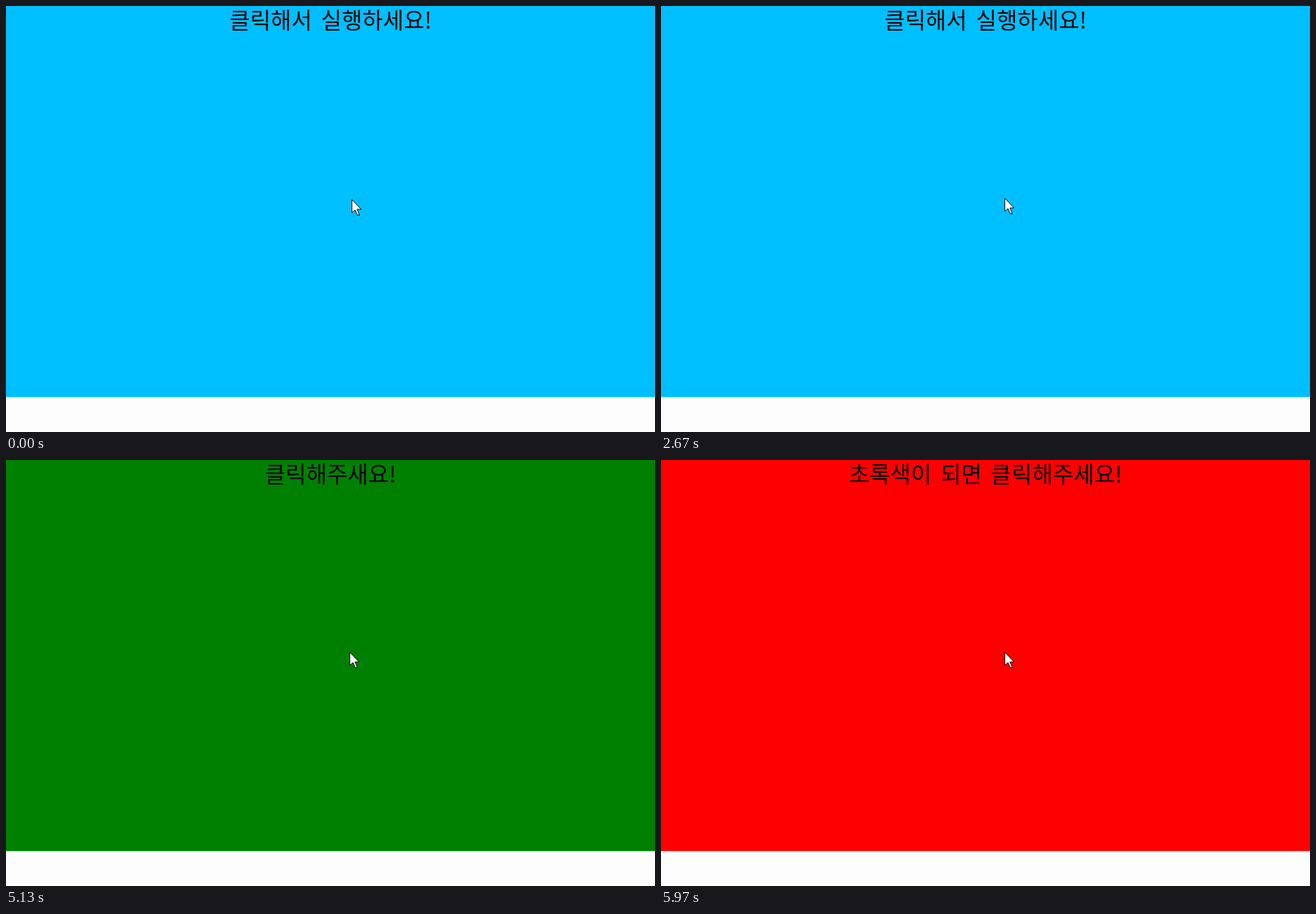
An HTML page that plays this animation: 924 by 606 pixels, repeating every 8 s.

```html
<!DOCTYPE html>
<html lang="ko">
<head>
<meta charset="utf-8">
<title>반응 속도</title>
<style>
  html, body { margin: 0; width: 100%; height: 100%; overflow: hidden; background: #fdfdfd; }
  svg { display: block; width: 924px; height: 606px; }
  text {
    font: 300 32px "Noto Sans CJK KR", "Noto Sans KR", "Noto Sans CJK", sans-serif;
    word-spacing: 3.8px;
    text-anchor: middle;
  }
</style>
</head>
<body>
<svg viewBox="0 0 924 606">
  <rect id="field" width="924" height="556.4"/>
  <text id="label" x="462" y="32"></text>
  <path id="cursor" d="M.5 .5V19L5 15.2 8.3 22.3H11.2L7.9 14.2H13.6Z"
        fill="#fff" stroke="#000" stroke-width="1"/>
</svg>
<script>
  const LOOP = 8000;
  const states = {
    idle: ['#00bfff', '클릭해서 실행하세요!'],
    wait: ['#ff0000', '초록색이 되면 클릭해주세요!'],
    go: ['#008000', '클릭해주새요!']
  };
  const steps = [
    [0, 'idle'], [200, 'wait'], [2330, 'go'],
    [2670, 'idle'], [2965, 'wait'], [5030, 'go'],
    [5500, 'idle'], [5920, 'wait']
  ];
  const [field, label, cursor] =
    ['field', 'label', 'cursor'].map(id => document.getElementById(id));
  let shown;

  function draw(t) {
    const name = steps.findLast(([start]) => start <= t)[1];
    if (name !== shown) {
      shown = name;
      const [color, words] = states[name];
      field.setAttribute('fill', color);
      label.textContent = words;
    }
    // The pointer drifts a few whole pixels before the first click.
    const p = Math.min(1, Math.max(0, (t - 20) / 140));
    const x = 492 - Math.round(3 * p);
    const y = 275 - Math.round(2 * p);
    cursor.setAttribute('transform', `translate(${x} ${y})`);
  }

  const begin = performance.now();
  function tick() {
    draw((performance.now() - begin) % LOOP);
    requestAnimationFrame(tick);
  }
  tick();
</script>
</body>
</html>
```
